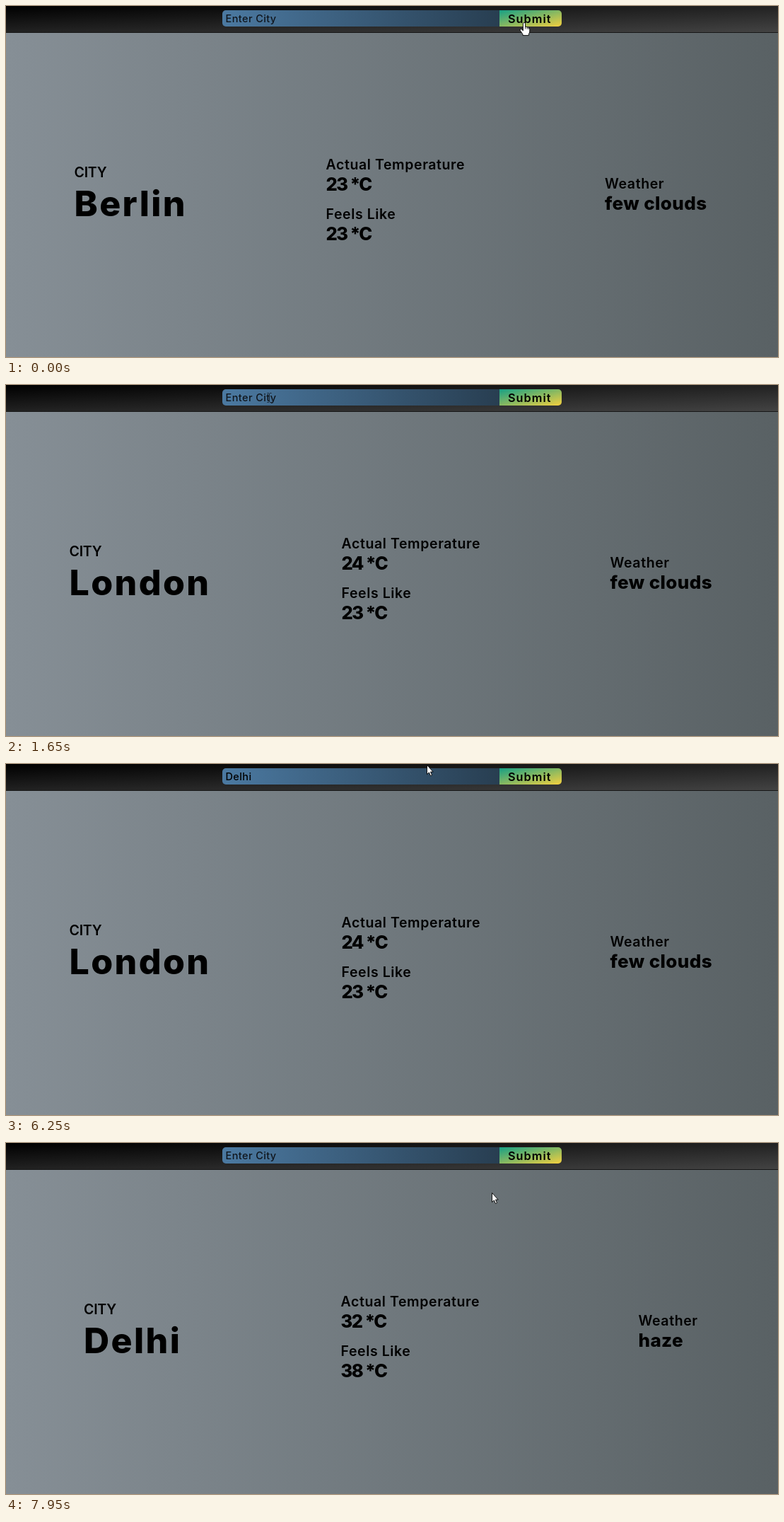
Recreate the animation shown at these times as an HTML page. Size 1092x496 px, loop 8000 ms.

```html
<!DOCTYPE html>
<html lang="en">
<head>
<meta charset="utf-8">
<title>Weather</title>
<style>
html, body { margin: 0; width: 100%; height: 100%; overflow: hidden; }
body { position: relative; background: linear-gradient(to right, #868f96, #596164); }
header { position: absolute; inset: 0 0 auto; height: 37px; border-bottom: 1px solid #161616;
  background: linear-gradient(to top left, #434343, #000); }
.field, .button { position: absolute; top: 6px; height: 22.5px; }
.field { left: 306px; width: 392px; border-radius: 5px 0 0 5px;
  background: linear-gradient(to right, #4b79a1, #283e51); }
.button { left: 698px; width: 88px; border-radius: 0 5px 5px 0;
  background: linear-gradient(to bottom right, #16a085, #f4d03f); }
svg { position: absolute; left: 0; top: 0; }
text { font-family: Inter, "Open Sans", sans-serif; font-optical-sizing: none; white-space: pre; }
.label { font-size: 19.5px; font-weight: 600; letter-spacing: .6px; }
.caps { letter-spacing: -.2px; }
.city { font-size: 50px; font-weight: 800; letter-spacing: 2.4px; }
.temp { font-size: 25.6px; font-weight: 800; letter-spacing: -1.6px; }
.sky { font-size: 26px; font-weight: 800; letter-spacing: .4px; }
.submit { font-size: 16.3px; font-weight: 600; letter-spacing: 1px; }
.input { font-size: 14.5px; font-weight: 500; letter-spacing: .4px; }
.shape { fill: #fff; stroke: #000; stroke-width: .9; stroke-linejoin: round; }
</style>
</head>
<body>
<header><div class="field"></div><div class="button"></div></header>
<svg width="1092" height="496" viewBox="0 0 1092 496">
  <text class="submit" x="710" y="24">Submit</text>
  <text class="input" id="input" x="310.5" y="23"></text>
  <rect id="caret" y="10" width="1" height="16"/>
  <g id="colCity">
    <text class="label caps" y="242">CITY</text>
    <text class="city" id="city" y="296.5"></text>
  </g>
  <g id="colTemp">
    <text class="label" y="231">Actual Temperature</text>
    <text class="temp" id="actual" y="260.5"></text>
    <text class="label" y="301">Feels Like</text>
    <text class="temp" id="feels" y="331"></text>
  </g>
  <g id="colSky">
    <text class="label" y="258">Weather</text>
    <text class="sky" id="sky" y="287.5"></text>
  </g>
  <g id="pointer">
    <path id="arrow" class="shape" d="M.5 .5V13.6L3.4 10.9L5.4 15.6L7.5 14.7L5.5 10.1H9.2Z"/>
    <g id="hand">
      <path class="shape" d="M-1.6 1.4Q0-.6 1.6 1.4V6.4Q3.2 5.6 4.1 7Q5.6 6.3 6.2 7.8Q7.8 7.5 7.8 9.5V13Q7.8 15 6.4 16.4V18.6H-2V17L-5.7 11.5Q-6.3 9.4-4.3 9.5L-1.6 11.8Z"/>
      <path d="M1.6 6.4V9.5M4.1 7V9.8M6.2 7.8V10" stroke="#000" stroke-width=".8"/>
    </g>
    <path id="beam" d="M-3-6.5H-1L0-5.5L1-6.5H3M0-5.5V5.5M-3 6.5H-1L0 5.5L1 6.5H3" fill="none" stroke="#1b2530"/>
  </g>
</svg>
<script>
const LOOP = 8000, TICK = 50;
const el = id => document.getElementById(id);

// start, column x positions, city, actual, feels like, weather
const reports = [
  [0, 96.5, 452.5, 847, "Berlin", 23, 23, "few clouds"],
  [50, 89.5, 474.5, 854.5, "London", 24, 23, "few clouds"],
  [7200, 110, 473.5, 894.5, "Delhi", 32, 38, "haze"]
];
// start, number of letters typed
const typing = [[0, 0], [3000, 1], [3450, 2], [3850, 3], [4250, 4], [4400, 5], [6950, 0]];
// start, caret shown
const blink = [[0, 0], [1950, 1], [2450, 0], [2950, 1], [4950, 0], [5450, 1], [6050, 0], [6500, 1], [6950, 0]];
// time, pointer x, pointer y
const path = [
  [0, 733, 23], [350, 733, 23], [400, 610, 120], [450, 469, 231], [600, 469, 231],
  [650, 390, 228], [700, 390, 228], [750, 208, 187], [800, 182, 166], [850, 170, 155],
  [1000, 170, 155], [1050, 173, 152], [1250, 235, 105], [1450, 330, 45], [1550, 362, 24],
  [1650, 372, 18], [6000, 372, 18], [6100, 400, 14], [6150, 460, 8], [6250, 595, 1],
  [6300, 595, 1], [6400, 690, 7], [6450, 712, 10], [6550, 725, 13], [6650, 729, 14],
  [6700, 729, 14], [6850, 730, 13], [7750, 730, 13], [7800, 724, 24], [7900, 702, 52],
  [7950, 687, 70]
];

const current = (rows, t) => rows.filter(r => r[0] <= t).pop();

function pointerAt(t) {
  const i = path.findIndex(p => p[0] > t);
  if (i < 0) return path[path.length - 1].slice(1);
  const [t0, x0, y0] = path[i - 1], [t1, x1, y1] = path[i];
  const k = (t - t0) / (t1 - t0);
  return [x0 + (x1 - x0) * k, y0 + (y1 - y0) * k].map(Math.round);
}

function setText(id, value) {
  if (el(id).textContent !== value) el(id).textContent = value;
}
const show = (id, on) => el(id).setAttribute("visibility", on ? "visible" : "hidden");
const move = (id, x, y = 0) => el(id).setAttribute("transform", `translate(${x} ${y})`);

function draw(t) {
  const [, xCity, xTemp, xSky, city, actual, feels, sky] = current(reports, t);
  move("colCity", xCity);
  move("colTemp", xTemp);
  move("colSky", xSky);
  setText("city", city);
  setText("actual", actual + " *C");
  setText("feels", feels + " *C");
  setText("sky", sky);

  const typed = "Delhi".slice(0, current(typing, t)[1]);
  setText("input", typed || "Enter City");
  el("input").setAttribute("fill", typed ? "#000" : "#10161d");
  const end = typed ? el("input").getComputedTextLength() : 1;
  el("caret").setAttribute("x", Math.round(310.5 + end));
  show("caret", current(blink, t)[1]);

  const [x, y] = pointerAt(t);
  const inBar = y >= 6 && y <= 28;
  const shape = inBar && x >= 698 && x < 786 ? "hand" : inBar && x >= 306 && x < 698 ? "beam" : "arrow";
  for (const id of ["arrow", "hand", "beam"]) show(id, id === shape);
  move("pointer", x + (shape === "beam" ? .5 : 0), y);
}

const start = performance.now();
function frame() {
  const t = (performance.now() - start) % LOOP;
  draw(Math.floor(t / TICK) * TICK);
  requestAnimationFrame(frame);
}
frame();
</script>
</body>
</html>
```
